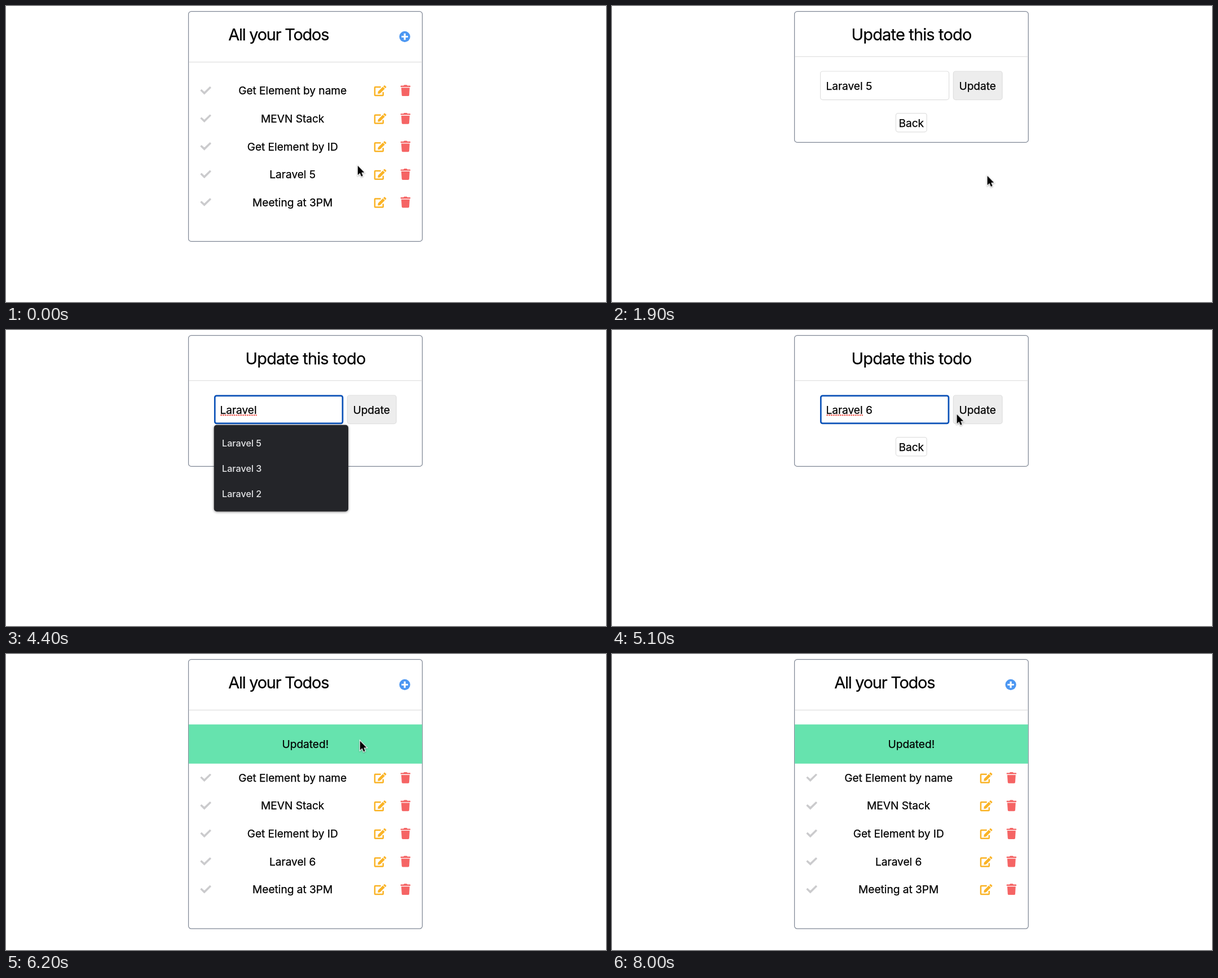
Recreate the animation shown at these times as an HTML page. Size 1064 px wide and 526 px high, loop 8.2 s.

```html
<!DOCTYPE html>
<html lang="en">
<head>
<meta charset="utf-8">
<title>Todos</title>
<style>
html, body { margin: 0; width: 100%; height: 100%; overflow: hidden; background: #fff; }
svg { display: block; width: 1064px; height: 526px; }
text { font: 19.2px Inter, sans-serif; font-optical-sizing: none; letter-spacing: -.06px; stroke: #000; stroke-width: .25; }
.mid { text-anchor: middle; }
.title { font-size: 29px; letter-spacing: -.85px; text-anchor: middle; }
.tight { letter-spacing: -1.27px; }
.card { fill: #fff; stroke: #7f8795; stroke-width: 1.24; }
.line, .box { fill: none; stroke: #dfdfdf; stroke-width: 1.24; }
.ring { fill: none; stroke: #0b52b8; stroke-width: 2.7; }
.popup text { font-size: 16.2px; font-weight: 500; letter-spacing: 0; fill: #e4e5e7; stroke: none; }
.popup rect { fill: #242529; filter: drop-shadow(0 1px 2px #0007); }
.shadow { filter: drop-shadow(0 1px 1px #0005); }

.cue { visibility: hidden; animation: 8.2s step-end infinite; }
.before { animation-name: before; }
.form { animation-name: form; }
.after { animation-name: after; }
.focus { animation-name: focus; }
.press { animation-name: press; }
.old { animation-name: old; }
.cut { animation-name: cut; }
.new { animation-name: new; }
.caret { animation-name: caret; }
.arrow { animation-name: arrow; }
.hand { animation-name: hand; }
.beam { animation-name: beam; }
.pointer { animation: move 8.2s step-end infinite; }

@keyframes before { 0% { visibility: visible } 23.17%, to { visibility: hidden } }
@keyframes form { 0%, 73.17%, to { visibility: hidden } 23.17% { visibility: visible } }
@keyframes after { 0% { visibility: hidden } 73.17%, to { visibility: visible } }
@keyframes focus { 0%, 65.85%, to { visibility: hidden } 36.58% { visibility: visible } }
@keyframes press { 0%, 73.17%, to { visibility: hidden } 65.85% { visibility: visible } }
@keyframes old { 0%, 42.68%, to { visibility: hidden } 23.17% { visibility: visible } }
@keyframes cut { 0%, 54.87%, to { visibility: hidden } 42.68% { visibility: visible } }
@keyframes new { 0%, 73.17%, to { visibility: hidden } 54.87% { visibility: visible } }
@keyframes caret {
  0%, 41.46%, 48.78%, 60.97%, to { visibility: hidden }
  36.58%, 54.87% { visibility: visible; transform: translateX(463.5px) }
  42.68% { visibility: visible; transform: translateX(449.5px) }
}
@keyframes arrow {
  0%, 23.17%, 62.19% { visibility: visible }
  6.09%, 35.36%, 91.46%, to { visibility: hidden }
}
@keyframes hand { 0%, 23.17%, to { visibility: hidden } 6.09% { visibility: visible } }
@keyframes beam {
  0%, 42.68%, 62.19%, to { visibility: hidden }
  35.36%, 58.53% { visibility: visible }
}
@keyframes move {
  0% { transform: translate(623.8px, 283.8px) }
  1.21% { transform: translate(630px, 286.5px); animation-timing-function: steps(5) }
  7.31% { transform: translate(662px, 301px) }
  12.19% { transform: translate(663px, 302px); animation-timing-function: steps(7) }
  20.73% { transform: translate(669px, 305px) }
  23.17% { transform: translate(665.6px, 301.8px) }
  28.04% { transform: translate(655px, 292px); animation-timing-function: steps(6) }
  35.36% { transform: translate(475px, 152.5px) }
  58.53% { transform: translate(478px, 152.5px); animation-timing-function: steps(3) }
  62.19% { transform: translate(611.6px, 149.8px); animation-timing-function: steps(3) }
  65.85% { transform: translate(627.8px, 154.4px) }
  76.82% { transform: translate(618px, 172px); animation-timing-function: steps(5) }
  82.92% { transform: translate(545px, 340px) }
  84.14% { transform: translate(527px, 364px); animation-timing-function: steps(5) }
  90.24%, to { transform: translate(838px, 168px) }
}
</style>
</head>
<body>
<svg viewBox="0 0 1064 526">
  <defs>
    <g id="icons">
      <path transform="translate(354.2 150.2)" fill="#cbcbcd" stroke="#cbcbcd" stroke-width="1.6" stroke-linejoin="round"
        d="M-8.8 0-2.5 6.2 8.8-5 7.5-6.3-2.5 3.3-7.5-1.3z"/>
      <g transform="translate(652.7 140.4)" fill="#fab325">
        <path fill="none" stroke="#fab325" stroke-width="2.48"
          d="M12 3.7H2.2Q1.24 3.7 1.24 4.7V17.6Q1.24 18.6 2.2 18.6H15.1Q16.1 18.6 16.1 17.6V12.6"/>
        <path d="M15.6 3.2 19.1 6.7 10.6 15.2 7.1 15.7Q6.5 15.7 6.6 15.1L7.1 11.7z"/>
        <path d="M16.4 2.4 18 .8Q18.6.3 19.2.8L21.5 3.1Q22.1 3.7 21.5 4.3L19.9 5.9z"/>
      </g>
      <g transform="translate(699.7 140.3)" fill="#f56464">
        <path d="M5.2 1.3 5.9.4Q6.2 0 6.7 0H10.7Q11.2 0 11.5.4L12.2 1.3H16.8Q17.4 1.3 17.4 1.9V3.1Q17.4 3.7 16.8 3.7H.6Q0 3.7 0 3.1V1.9Q0 1.3.6 1.3z"/>
        <path d="M1.24 5H16.1L15.3 18.1Q15.2 19.8 13.5 19.8H3.9Q2.2 19.8 2.1 18.1z"/>
      </g>
    </g>
    <g id="head">
      <text class="title tight" x="483.2" y="61">All your Todos</text>
      <path class="line" d="M324 99.7H738"/>
      <circle cx="707.1" cy="54.5" r="9.7" fill="#4c97f2"/>
      <path d="M701.4 54.5H712.8M707.1 48.8V60.2" stroke="#fff" stroke-width="3.2"/>
    </g>
    <g id="todos" class="mid">
      <text x="508.2" y="157.3">Get Element by name</text>
      <text x="508.2" y="206.9">MEVN Stack</text>
      <text x="508.2" y="256.5">Get Element by ID</text>
      <text x="508.2" y="355.7">Meeting at 3PM</text>
      <use href="#icons"/>
      <use href="#icons" y="49.6"/>
      <use href="#icons" y="99.2"/>
      <use href="#icons" y="148.8"/>
      <use href="#icons" y="198.4"/>
    </g>
  </defs>

  <g class="cue before">
    <rect class="card" x="323.6" y="9.6" width="414.7" height="408.8" rx="5"/>
    <use href="#head"/>
    <use href="#todos"/>
    <text class="mid" x="508.2" y="306.1">Laravel 5</text>
  </g>

  <g class="cue form">
    <rect class="card" x="323.6" y="9.6" width="414.7" height="232.8" rx="5"/>
    <text class="title" x="531" y="61">Update this todo</text>
    <path class="line" d="M324 89.8H738"/>
    <rect class="box" x="369.6" y="116" width="228" height="50.6" rx="4"/>
    <rect class="box" x="605.3" y="116" width="86.8" height="50.6" rx="4" style="fill:#ededed"/>
    <text class="mid" x="648.2" y="148.8">Update</text>
    <rect class="box" x="503.4" y="190.6" width="54.8" height="33.2" rx="4"/>
    <text class="mid" x="530.8" y="214.5">Back</text>
  </g>

  <g class="cue focus">
    <rect class="ring" x="370.3" y="116.8" width="226.6" height="49" rx="3"/>
    <path d="M381.3 151.4H444" fill="none" stroke="#f0584f" stroke-width="2.3" stroke-linecap="round" stroke-dasharray=".8 3.1"/>
  </g>
  <rect class="cue press ring" x="606.2" y="116.8" width="85.2" height="49" rx="3"/>
  <text class="cue old" x="379.4" y="148.8">Laravel 5</text>
  <text class="cue cut" x="379.4" y="148.8">Laravel</text>
  <text class="cue new" x="379.4" y="148.8">Laravel 6</text>
  <path class="cue caret" d="M0 130.5V153" stroke="#000" stroke-width="1.2"/>

  <g class="cue cut popup">
    <rect x="368.8" y="168.8" width="238.2" height="153.6" rx="5"/>
    <text x="383" y="207.4">Laravel 5</text>
    <text x="383" y="252">Laravel 3</text>
    <text x="383" y="296.6">Laravel 2</text>
  </g>

  <g class="cue after">
    <rect class="card" x="323.6" y="9.6" width="414.7" height="478.6" rx="5"/>
    <use href="#head"/>
    <rect x="324.1" y="125.2" width="413.7" height="69.6" fill="#66e3ae"/>
    <text class="mid" x="530.8" y="167.2">Updated!</text>
    <use href="#todos" y="69.6"/>
    <text class="mid" x="508.2" y="375.7">Laravel 6</text>
  </g>

  <g class="pointer">
    <path class="cue arrow shadow" stroke="#fff" stroke-width="2.2" paint-order="stroke"
      d="M0 0V16.5L3.8 13 6.3 19 9 17.9 6.6 12H11.6z"/>
    <path class="cue hand shadow" fill="#fff" stroke="#000" stroke-width="1.2" stroke-linejoin="round"
      d="M-2 10V1.5a1.7 1.7 0 0 1 3.4 0V7q1.5-1.2 3.2.4 1.7-.9 3 .6 2.8-.4 2.8 2.5v3.2q0 2.6-1.6 4.8v2.2H0v-1.8q-2.2-2-4-5.4-2.2-3.2-2.4-4.6.4-1.8 2.2-.6z"/>
    <path class="cue beam" fill="none" stroke="#111" stroke-width="1.4"
      d="M-4-9.3Q0-9.3 0-6.5 0-9.3 4-9.3M0-7V7M-4 9.3Q0 9.3 0 6.5 0 9.3 4 9.3M-2 1.8H2"/>
  </g>
</svg>
</body>
</html>
```
